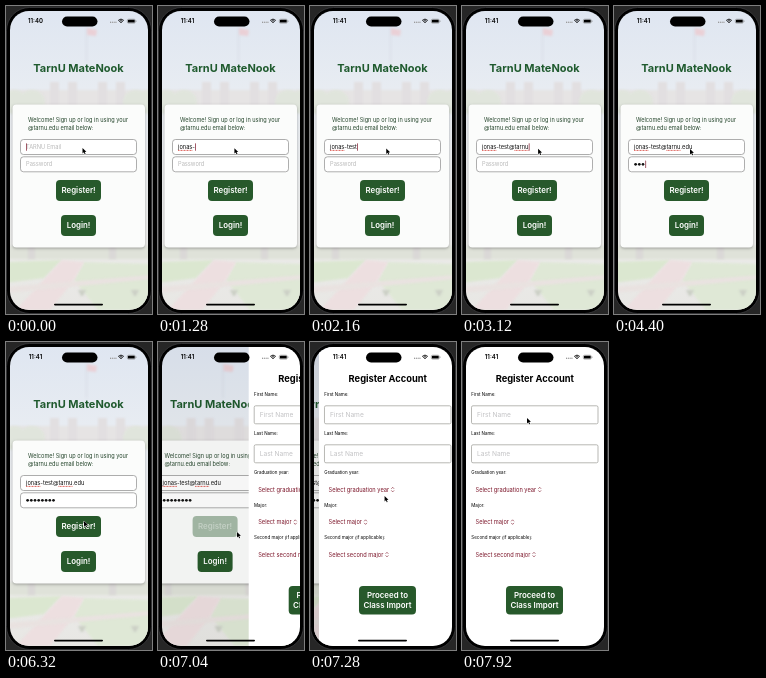
An HTML page with a canvas that plays this animation: 146x308 px, repeating every 8 s.

```html
<!DOCTYPE html>
<html lang="en">
<head>
<meta charset="utf-8">
<title>Sign up flow</title>
<style>
html, body { margin: 0; width: 100%; height: 100%; overflow: hidden; background: #262626; }
canvas { display: block; width: 146px; height: 308px; }
</style>
</head>
<body>
<canvas id="stage"></canvas>
<script>
const W = 146, H = 308, LOOP = 8000;
const SCREEN = { x: 4, y: 5, w: 138, h: 299, r: 19 };
const GREEN = '#27592b', MAROON = '#7b1428', INK = '#111';
const EMAIL = 'jonas-test@tarnu.edu';
const canvas = document.getElementById('stage');
const ctx = canvas.getContext('2d');
const dpr = Math.max(1, window.devicePixelRatio || 1);
canvas.width = W * dpr;
canvas.height = H * dpr;

const clamp = (v, a = 0, b = 1) => Math.min(b, Math.max(a, v));
const smooth = p => p * p * (3 - 2 * p);

function box(x, y, w, h, r, fill, stroke, lw = 0.7) {
  ctx.beginPath();
  ctx.roundRect(x, y, w, h, r);
  if (fill) { ctx.fillStyle = fill; ctx.fill(); }
  if (stroke) { ctx.strokeStyle = stroke; ctx.lineWidth = lw; ctx.stroke(); }
}

function poly(points, fill) {
  ctx.beginPath();
  for (let i = 0; i < points.length; i += 2) ctx.lineTo(points[i], points[i + 1]);
  ctx.closePath();
  ctx.fillStyle = fill;
  ctx.fill();
}

function text(str, x, y, size, color = INK, weight = 400, align = 'left') {
  ctx.font = `${weight} ${size}px Inter, sans-serif`;
  ctx.textAlign = align;
  ctx.fillStyle = color;
  ctx.fillText(str, x, y);
  return ctx.measureText(str).width;
}

function button(lines, x, y, w, h, alpha = 1) {
  ctx.save();
  ctx.globalAlpha = alpha;
  box(x, y, w, h, 4, GREEN);
  const first = y + h / 2 + 2.8 - (lines.length - 1) * 4.9;
  lines.forEach((s, i) => text(s, x + w / 2, first + i * 9.8, 7.9, '#fff', 600, 'center'));
  ctx.restore();
}

// Soft, washed-out campus view behind the card.
function backdrop() {
  const sky = ctx.createLinearGradient(0, 5, 0, 304);
  sky.addColorStop(0, '#dfe6f1');
  sky.addColorStop(0.3, '#e9edf2');
  sky.addColorStop(0.78, '#ebebe9');
  sky.addColorStop(1, '#e8e7e4');
  ctx.fillStyle = sky;
  ctx.fillRect(0, 0, W + 4, H);
  ctx.save();
  ctx.filter = 'blur(0.8px)';
  box(80, 22, 0.7, 34, 0, '#d3d7de');
  poly([81, 22, 91, 24, 90, 30, 81, 29], '#ead0d6');
  box(4, 84, 140, 20, 0, '#e6e4e4');
  for (const x of [44, 62, 92, 110]) box(x, 76, 9, 26, 0, '#e2dfe1');
  ctx.fillStyle = '#e0e5dc';
  ctx.beginPath();
  for (const x of [8, 26, 130, 144]) ctx.ellipse(x, 96, 13, 12, 0, 0, 7);
  ctx.fill();
  ctx.fillStyle = '#dfe2d9';
  ctx.fillRect(0, 240, W + 4, 13);
  for (const x of [22, 103]) box(x, 236, 7, 17, 0, '#dad8d7');
  poly([0, 256, 56, 254, 38, 272, 0, 277], '#dbe7d0');
  poly([78, 256, 146, 258, 146, 304, 92, 304, 68, 274], '#dfe8d6');
  poly([56, 254, 78, 256, 68, 274, 44, 304, 10, 304], '#eddfe0');
  poly([0, 281, 146, 269, 146, 273, 0, 287], '#e9e2e0');
  for (const x of [76, 129]) poly([x - 4, 284, x + 4, 284, x + 1, 290, x - 1, 290], '#ccd0c6');
  ctx.restore();
}

const caretOn = t => t % 1000 < 560;

function caret(x, y, t) {
  if (caretOn(t)) box(x, y - 3.8, 0.7, 7.6, 0.3, MAROON);
}

function squiggle(x, w) {
  ctx.save();
  ctx.strokeStyle = '#d5382f';
  ctx.lineWidth = 0.8;
  ctx.setLineDash([1, 0.5]);
  ctx.beginPath();
  ctx.moveTo(x, 144.4);
  ctx.lineTo(x + w, 144.4);
  ctx.stroke();
  ctx.restore();
}

function emailField(t) {
  box(14.5, 133.5, 116, 15, 3, '#fff', '#8b8b8b');
  const n = clamp(Math.floor((t - 180) / 183), 0, EMAIL.length);
  const typed = EMAIL.slice(0, n);
  let w = 0;
  if (n) w = text(typed, 20, 143, 5.7);
  else text('TARNU Email', 20, 143, 5.7, '#b9b9b9');
  if (n > 5) squiggle(20, ctx.measureText(EMAIL.slice(0, 5)).width);
  if (n > 15) {
    const left = ctx.measureText(EMAIL.slice(0, 11)).width;
    squiggle(20 + left, ctx.measureText(EMAIL.slice(11, 16)).width);
  }
  if (t < 4050) caret(20.3 + w, 141, t);
}

function passwordField(t) {
  box(14.5, 150.8, 116, 15, 3, '#fff', '#8b8b8b');
  const n = clamp(Math.floor((t - 3960) / 145), 0, 8);
  if (!n) text('Password', 20, 160.4, 5.7, '#b9b9b9');
  ctx.fillStyle = INK;
  for (let i = 0; i < n; i++) {
    ctx.beginPath();
    ctx.arc(21.6 + i * 3.7, 158.3, 1.35, 0, 7);
    ctx.fill();
  }
  if (t >= 4050 && t < 6200) caret(20.3 + n * 3.7, 158.3, t);
}

function signIn(t) {
  backdrop();
  text('TarnU MateNook', 72.5, 66, 11, '#1f5a2e', 700, 'center');
  ctx.save();
  ctx.shadowColor = 'rgba(0,0,0,.3)';
  ctx.shadowBlur = 3 * dpr;
  ctx.shadowOffsetY = dpr;
  box(6.5, 98.5, 132.5, 143, 4, '#fbfcfb');
  ctx.restore();
  text('Welcome! Sign up or log in using your', 22, 116, 5.6, '#24452b');
  text('@tarnu.edu email below:', 22, 123.6, 5.6, '#24452b');
  emailField(t);
  passwordField(t);
  const press = clamp((t - 6840) / 120);
  button(['Register!'], 50, 174, 45, 21, 1 - 0.6 * press);
  button(['Login!'], 55, 209, 35, 21);
}

function picker(label, y) {
  const x = 13.5 + text(label, 13.5, y, 5.7, MAROON) + 2.2;
  ctx.strokeStyle = MAROON;
  ctx.lineWidth = 0.6;
  for (const s of [-1, 1]) {
    const m = y - 2 + s * 0.8;
    ctx.beginPath();
    ctx.moveTo(x, m);
    ctx.lineTo(x + 1.4, m + s * 1.5);
    ctx.lineTo(x + 2.8, m);
    ctx.stroke();
  }
}

function register() {
  ctx.fillStyle = '#fff';
  ctx.fillRect(SCREEN.x, SCREEN.y, SCREEN.w, SCREEN.h);
  text('Register Account', 72.8, 40, 9.3, '#000', 700, 'center');
  [['First Name', 53.5, 63.8], ['Last Name', 93, 102.8]].forEach(([name, ly, by]) => {
    text(name + ':', 9.3, ly, 4.5, '#000');
    box(9.5, by, 126.5, 18, 1.5, '#fff', '#9a9a94');
    text(name, 15, by + 11.4, 6.6, '#c2c2c4');
  });
  [['Graduation year:', 'Select graduation year', 132],
   ['Major:', 'Select major', 164.5],
   ['Second major (if applicable):', 'Select second major', 197]].forEach(([label, pick, y]) => {
    text(label, 9.3, y, 4.5, '#000');
    picker(pick, y + 17.6);
  });
  button(['Proceed to', 'Class Import'], 44, 244, 57, 28.5);
}

function statusBar(t) {
  text(t < 640 ? '11:40' : '11:41', 29.5, 17.2, 6, '#000', 600, 'center');
  box(56, 10.4, 35.5, 10.2, 5.1, '#000');
  for (let i = 0; i < 4; i++) box(104 + i * 1.8, 15.6, 1.1, 1.4, 0.5, '#999');
  ctx.strokeStyle = '#000';
  ctx.lineWidth = 0.9;
  for (const r of [1, 2.5, 4]) {
    ctx.beginPath();
    ctx.arc(115, 17.3, r, -Math.PI * 0.75, -Math.PI * 0.25);
    ctx.stroke();
  }
  box(121.3, 13.2, 8, 4, 1.2, null, '#777', 0.5);
  box(121.9, 13.8, 6.8, 2.8, 0.7, '#000');
  box(129.8, 14.5, 0.5, 1.4, 0.2, '#777');
}

const PATH = [[0, 76.5, 142], [4400, 76, 143], [5500, 76, 143], [6100, 78, 179],
  [6320, 78, 179], [6680, 79, 190], [7060, 79, 190], [7650, 65, 76], [8000, 65, 76]];

function pointer(t) {
  let i = 1;
  while (i < PATH.length - 1 && t > PATH[i][0]) i++;
  const a = PATH[i - 1], b = PATH[i];
  const p = smooth(clamp((t - a[0]) / (b[0] - a[0])));
  ctx.save();
  ctx.translate(a[1] + (b[1] - a[1]) * p, a[2] + (b[2] - a[2]) * p);
  ctx.beginPath();
  [[0, 0], [0, 5.4], [1.3, 4.3], [2.2, 6.3], [3.1, 5.9], [2.2, 3.9], [3.9, 3.8]]
    .forEach(([x, y]) => ctx.lineTo(x, y));
  ctx.closePath();
  ctx.strokeStyle = '#fff';
  ctx.lineWidth = 0.9;
  ctx.stroke();
  ctx.fillStyle = '#000';
  ctx.fill();
  ctx.restore();
}

function slide(t) {
  const s = Math.max(0, t - 6960) / 1000 * 16;
  return 1 - (1 + s) * Math.exp(-s);
}

function draw(t) {
  ctx.setTransform(dpr, 0, 0, dpr, 0, 0);
  ctx.fillStyle = '#262626';
  ctx.fillRect(0, 0, W, H);
  box(0.5, 1.5, 145, 306, 23, '#000', '#3d3d3f', 0.8);

  ctx.save();
  ctx.beginPath();
  ctx.roundRect(SCREEN.x, SCREEN.y, SCREEN.w, SCREEN.h, SCREEN.r);
  ctx.clip();
  const p = slide(t);
  if (p < 0.998) {
    ctx.save();
    ctx.translate(-0.3 * SCREEN.w * p, 0);
    signIn(t);
    ctx.restore();
  }
  if (p > 0) {
    ctx.fillStyle = `rgba(0,0,0,${0.1 * p})`;
    ctx.fillRect(0, 0, W, H);
    ctx.translate(SCREEN.w * (1 - p), 0);
    register();
  }
  ctx.restore();

  statusBar(t);
  box(48, 297.8, 49, 1.6, 0.8, '#000');
  pointer(t);
}

function tick() {
  draw(performance.now() % LOOP);
  requestAnimationFrame(tick);
}
tick();
</script>
</body>
</html>
```
